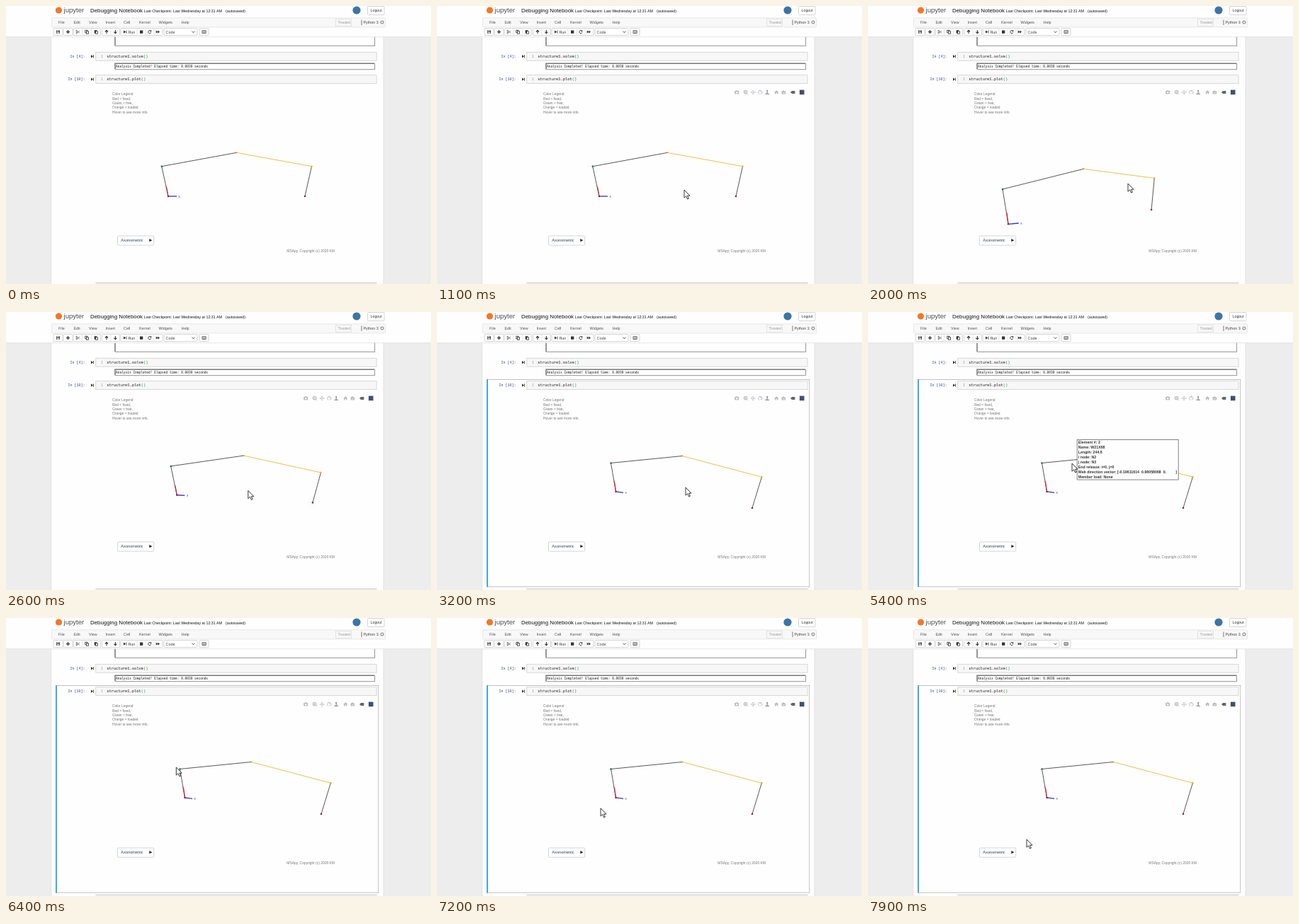
Write an HTML page that moves like this. It is 600x393 px and loops after 8 s.

```html
<!DOCTYPE html>
<html lang="en">
<head>
<meta charset="utf-8">
<title>Debugging Notebook</title>
<style>
html, body { margin: 0; width: 100%; height: 100%; overflow: hidden; background: #eee; }
svg { display: block; width: 600px; height: 393px; font-family: "Liberation Sans", Arial, sans-serif; }
.mono { font-family: "Liberation Mono", "Courier New", monospace; }
text { white-space: pre; }
</style>
</head>
<body>
<svg id="stage" viewBox="0 0 600 393"></svg>
<script>
const stage = document.getElementById('stage');

// Markup helpers
const rect = (x, y, w, h, fill, stroke = 'none', extra = '') =>
  `<rect x="${x}" y="${y}" width="${w}" height="${h}" fill="${fill}" stroke="${stroke}" stroke-width=".8" ${extra}/>`;
const text = (x, y, size, s, fill = '#333', extra = '') =>
  `<text x="${x}" y="${y}" font-size="${size}" fill="${fill}" ${extra}>${s}</text>`;
const path = (d, fill, stroke = 'none', w = 1, extra = '') =>
  `<path d="${d}" fill="${fill}" stroke="${stroke}" stroke-width="${w}" ${extra}/>`;
const circle = (x, y, r, fill, stroke = 'none', w = 1) =>
  `<circle cx="${x}" cy="${y}" r="${r}" fill="${fill}" stroke="${stroke}" stroke-width="${w}"/>`;
const at = (x, y, s) => `<g transform="translate(${x} ${y})">${s}</g>`;
const line = (d, color = '#333', w = 1) => path(d, 'none', color, w);

function header() {
  const menu = [[74, 'File'], [95.5, 'Edit'], [117, 'View'], [140.5, 'Insert'], [166, 'Cell'],
    [188, 'Kernel'], [215.5, 'Widgets'], [247.5, 'Help']];
  const buttons = [[67, 13], [81, 13], [95, 38.5], [135.5, 25], [162, 59], [223, 47], [273, 13]];
  const ink = '#333';
  return rect(0, 0, 600, 43.5, '#fefefe') + line('M0 43.7H600', '#e0e0e0', .7) +
    circle(74.5, 6, 4.6, '#f37726') +
    text(81.5, 9, 9.6, 'jupyter', '#4e4e4e') +
    text(119, 8.9, 7.88, 'Debugging Notebook', '#111') +
    text(194.8, 8.9, 5.3, 'Last Checkpoint: Last Wednesday at 12:31 AM', '#111') +
    text(310, 8.9, 5.3, '(autosaved)', '#111') +
    circle(495, 6, 5.6, '#3b75a8') +
    rect(510.5, .5, 23.5, 12, '#fff', '#ccc', 'rx="1"') + text(514.5, 8.4, 5.3, 'Logout') +
    rect(64.5, 16.8, 471, 13, '#f8f8f8', '#e4e4e4', 'rx="1"') +
    menu.map(([x, s]) => text(x, 25, 5.4, s, '#555')).join('') +
    rect(465.5, 18.3, 22, 10, '#f8f8f8', '#ddd') + text(468.5, 25, 5.2, 'Trusted', '#999') +
    line('M502 19.5V27', '#444', .7) + text(504.5, 25, 5.4, 'Python 3', '#444') +
    circle(531, 23, 2, 'none', '#555', .8) +
    buttons.map(([x, w]) => rect(x, 31.6, w, 10, '#fff', '#ccc', 'rx=".8"')).join('') +
    line('M107.5 32V41M120.5 32V41M148 32V41M185 32V41M197 32V41M209 32V41', '#ddd', .7) +
    at(73.5, 36.6, rect(-2.3, -2.3, 4.6, 4.6, ink) + rect(-1.2, -2, 2, 1.5, '#fff') + rect(-1.5, .4, 3, 1.5, '#fff')) +
    line('M85 36.6H90M87.5 34.1V39.1', ink, 1.4) +
    at(101.5, 36.6, line('M-1.2 -1.2L2.4 1.6M-1.2 1.2L2.4 -1.6', ink, .6) +
      circle(-1.8, -1.4, .9, 'none', ink, .6) + circle(-1.8, 1.4, .9, 'none', ink, .6)) +
    at(114, 36.6, rect(-2.2, -2.4, 3, 3.6, '#fff', ink) + rect(-.6, -1, 3, 3.6, '#fff', ink)) +
    at(127, 36.6, rect(-2.3, -2.4, 3.6, 4.4, ink) + rect(-.4, -.8, 2.8, 3.4, '#fff', ink)) +
    line('M142 39.2V34.4M140 36.5L142 34.4L144 36.5M154.4 34V38.8M152.4 36.7L154.4 38.8L156.4 36.7', ink, 1.1) +
    path('M166 34.4L169.2 36.6L166 38.8Z', ink) + line('M170 34.4V38.8', ink, .8) +
    text(172.5, 38.6, 5.3, 'Run') +
    rect(189, 34.5, 4.3, 4.3, ink) +
    line('M204.6 35.4A2.1 2.1 0 1 0 204.9 37.3', ink, .9) + path('M205.3 33.8V36.3H202.8Z', ink) +
    path('M211.7 34.4L214.3 36.6L211.7 38.8ZM214.3 34.4L217 36.6L214.3 38.8Z', ink) +
    text(225.5, 38.7, 5.4, 'Code', '#444') + line('M262.5 35.7L264.5 37.7L266.5 35.7', ink, .9) +
    rect(277, 34.8, 5.2, 3.6, '#fff', '#444') + line('M277.5 36H282M278.2 37.3H281', '#555', .6);
}

function prompt(y, label) {
  return text(111.5, y, 5, label, '#303f9f', 'class="mono" text-anchor="end"') +
    path(`M120 ${y - 4}L123 ${y - 1.8}L120 ${y + .4}Z`, '#333') +
    line(`M123.5 ${y - 4}V${y + .4}`, '#333', .8);
}

function codeCell(y, label, call) {
  return prompt(y + 7.7, label) + rect(126.8, y, 396.3, 11.9, '#f7f7f7', '#cfcfcf') +
    text(134, y + 7.7, 5, '1', '#999', 'class="mono"') +
    text(142.3, y + 7.6, 5.38, `structure1.${call}<tspan fill="#0a9a2a">()</tspan>`, '#111', 'class="mono"');
}

function outputFrame(y, h) {
  return rect(154, y, 366.5, h, '#fefefe') +
    line(`M154 ${y + h}V${y}H520.5`, '#777', 1.5) +
    line(`M154 ${y + h}H520.5V${y}`, '#a8a8a8', 1.3);
}

function page() {
  const legend = ['Color Legend', 'Red = fixed,', 'Green = free,', 'Orange = loaded', 'Hover to see more info.'];
  return rect(0, 0, 600, 393, '#ededed') +
    rect(63.2, 40, 470.3, 360, '#e2e2e2') + rect(64.2, 40, 468.3, 360, '#fefefe') +
    outputFrame(30, 26.3) +
    `<g id="selection">${rect(70.5, 95.5, 455.3, 292.7, '#fefefe', '#b5b5b5')}${rect(70, 95.2, 2, 293.4, '#42a5f5')}</g>` +
    codeCell(65.3, 'In [4]:', 'solve') +
    outputFrame(81.2, 8.4) +
    text(155, 87, 4.52, 'Analysis Completed! Elapsed time: 0.0030 seconds', '#111', 'class="mono"') +
    codeCell(97.7, 'In [10]:', 'plot') +
    legend.map((s, i) => text(150, 126.3 + i * 6.35, 4.9, s, '#777')).join('') +
    rect(157.5, 325, 51.2, 13.2, '#fff', '#c3cbd9', 'rx="1"') +
    text(162.3, 333.2, 5.65, 'Axonometric', '#2a3f5f') +
    path('M202.3 329.1L206.3 331.2L202.3 333.3Z', '#222') +
    text(396.3, 347.8, 4.95, 'MSApy, Copyright (c) 2020 KM', '#777') +
    line('M126.5 391.4H523.5', '#bbb', 1) + rect(126.8, 391.8, 396.3, 3, '#f5f5f5');
}

function modebar() {
  const c = '#b9bcc2', y = 122;
  return at(423.2, y, rect(-3, -2, 6, 4.4, c) + rect(-1.2, -2.8, 2.4, 1, c) + circle(0, .2, 1.2, '#fff')) +
    at(436, y, circle(-.4, -.4, 2.3, 'none', c, 1.1) + line('M1.2 1.2L3.2 3.2M-1.6 -.4H.8M-.4 -1.6V.8', c, .9)) +
    at(446.2, y, line('M-3 0H3M0 -3V3M-2 -1L-3 0L-2 1M2 -1L3 0L2 1M-1 -2L0 -3L1 -2M-1 2L0 3L1 2', c, .8)) +
    at(456.2, y, line('M2.2 -1.6A2.7 2.7 0 1 0 -1 2.5M-.6 -.8A2 1.6 0 1 1 .6 1.8', c, 1)) +
    at(466.2, y, line('M0 -3V2M-2.8 2.3H2.8', '#8b919b', 1.3) + circle(0, -2.2, 1, '#8b919b')) +
    at(479.2, y, path('M-3.2 0L0 -2.8L3.2 0H2.2V2.6H.7V.7H-.7V2.6H-2.2V0Z', c)) +
    at(489.2, y, path('M-3.2 -.5L-.4 -2.8L3 -1V2.6H-2.6V0Z', c) + line('M-1 .8H2', '#fff', .7)) +
    at(502.2, y, path('M-3.2 0L-1.2 -2H3.2V2H-1.2Z', '#62676f')) +
    rect(511.9, 118.6, 6.6, 6.6, '#3f4f75');
}

function tooltip() {
  const rows = ['Element #: 2', 'Name: W21X68', 'Length: 244.8', 'i node: N2', 'j node: N3',
    'End release: i=0, j=0', 'Web direction vector: [-0.19611614  0.98058068  0.', 'Member load: None'];
  const bold = 'font-weight="bold"';
  return rect(295.2, 180.4, 143, 56.7, '#fefefe', '#666') +
    rows.map((s, i) => text(296.8, 186.3 + i * 7, 5.27, s, '#333', bold)).join('') +
    text(434.2, 228.3, 5.27, ']', '#333', bold);
}

stage.innerHTML = page() + `<g id="frame"></g><g id="modebar">${modebar()}</g>` + header() +
  `<g id="tooltip">${tooltip()}</g><g id="cursor">` +
  path('M0 0V11.2L2.6 8.8L4.6 13L6.4 12.2L4.5 8.2H8Z', '#fff', '#222', .9, 'stroke-linejoin="round"') + '</g>';

const $ = id => document.getElementById(id);
const show = (id, on) => $(id).setAttribute('visibility', on ? 'visible' : 'hidden');

// Each point of the model: turned one way, straight, turned the other way
const model = {
  base1: [[198, 308.3], [229, 269], [252.5, 254]],
  top1: [[190, 259], [219.8, 226.7], [245.5, 213.5]],
  apex: [[304.3, 230.3], [325.3, 207.3], [346.2, 203.5]],
  top2: [[404.3, 243.4], [431.5, 226.7], [458.4, 233.3]],
  base2: [[400.1, 288], [422, 269], [445, 277]],
  axisX: [[212.7, 307], [241, 269], [263, 255.4]],
  axisY: [[196, 292.5], [226.6, 256], [250.5, 240]]
};
const turn = ([a, m, b], u) => m.map((v, i) => v + u * (b[i] - a[i]) / 2 + u * u * ((a[i] + b[i]) / 2 - v));

function drawFrame(u) {
  const p = {};
  for (const k in model) p[k] = turn(model[k], u);
  const seg = (a, b, color, w) => line(`M${p[a]}L${p[b]}`, color, w);
  const dot = (k, r, color) => circle(...p[k], r, color);
  const [x, y] = p.axisX, [vx, vy] = p.axisY;
  $('frame').innerHTML =
    seg('base1', 'top1', '#444', .9) + seg('top1', 'apex', '#444', .9) +
    seg('top2', 'base2', '#444', .9) + seg('apex', 'top2', '#f3bd48', 1) +
    seg('base1', 'axisY', '#c22038', 1.2) + seg('base1', 'axisX', '#3030c8', 1.3) +
    text(x + 2.6, y + 1.5, 4.6, 'x', '#4040d0') + text(vx - 1.4, vy, 3.6, 'y', '#d04050') +
    dot('base1', 1.2, '#b0102c') + dot('base2', 1.3, '#b01028') +
    dot('top1', 1.2, '#146b3c') + dot('apex', 1, '#b99a2c') + dot('top2', 1.2, '#eda91f');
}

// Keys are [time, ...values], eased between neighbours
function track(keys, t) {
  if (t <= keys[0][0]) return keys[0].slice(1);
  for (let i = 1; i < keys.length; i++) {
    const a = keys[i - 1], b = keys[i];
    if (t <= b[0]) {
      const k = (t - a[0]) / (b[0] - a[0]), e = k * k * (3 - 2 * k);
      return a.slice(1).map((v, j) => v + (b[j + 1] - v) * e);
    }
  }
  return keys[keys.length - 1].slice(1);
}

const pointer = [[200, 556, 394], [1000, 349, 260], [1200, 349, 260], [2000, 367, 251],
  [2900, 333, 253], [3200, 351, 248], [3400, 351, 248], [4000, 288, 214], [5500, 288, 214],
  [6200, 240.3, 211], [6600, 240.3, 211], [7700, 224, 313]];
const spin = [[1200, 0], [2000, -1], [2900, 1]];

function draw(now) {
  const t = Math.floor(now % 8000 / 100) * 100;
  const [x, y] = track(pointer, t);
  $('cursor').setAttribute('transform', `translate(${x} ${y})`);
  show('cursor', t >= 200);
  show('modebar', t >= 600);
  show('selection', t >= 3000);
  show('tooltip', t >= 4000 && t < 5600);
  drawFrame(track(spin, t)[0]);
  requestAnimationFrame(draw);
}
draw(0);
</script>
</body>
</html>
```
